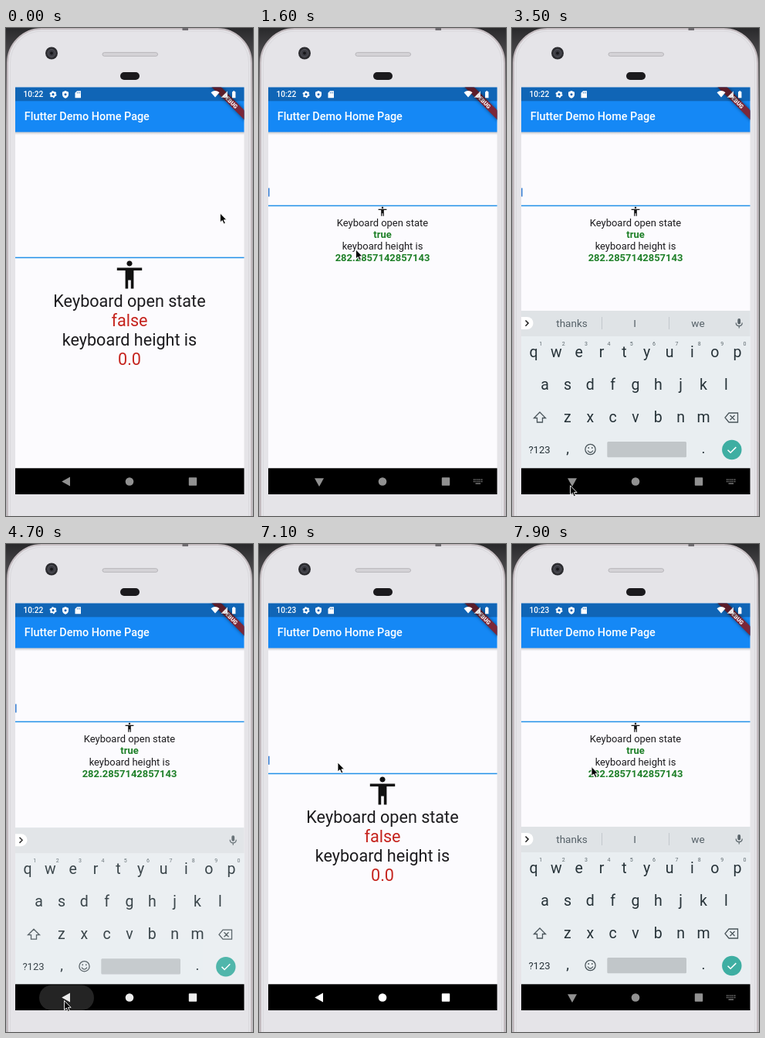
An HTML page that plays this animation: 320 by 630 pixels, repeating every 8000 ms.

```html
<!DOCTYPE html>
<html lang="en">
<head>
<meta charset="utf-8">
<title>Keyboard state demo</title>
<style>
html, body { margin: 0; width: 100%; height: 100%; overflow: hidden; background: #d6d5d9; }
svg { display: block; width: 320px; height: 630px; font-family: Roboto, "Noto Sans", sans-serif; }
.mid { text-anchor: middle; }
</style>
</head>
<body>
<svg viewBox="0 0 320 630">
  <defs>
    <linearGradient id="backdrop" x2="0" y2="1">
      <stop offset="0" stop-color="#29292b"/>
      <stop offset=".07" stop-color="#555356"/>
      <stop offset=".2" stop-color="#a3a1a5"/>
      <stop offset="1" stop-color="#b9b8bc"/>
    </linearGradient>
    <linearGradient id="shade" x2="0" y2="1">
      <stop offset="0" stop-color="#000" stop-opacity=".22"/>
      <stop offset="1" stop-color="#000" stop-opacity="0"/>
    </linearGradient>
    <filter id="blur" x="-50%" y="-100%" width="200%" height="300%"><feGaussianBlur stdDeviation="2"/></filter>
    <clipPath id="screen"><rect x="12" y="76.500" width="296.500" height="525.500"/></clipPath>
    <path id="person" d="M12 2c1.1 0 2 .9 2 2s-.9 2-2 2-2-.9-2-2 .9-2 2-2zm9 7h-6v13h-2v-6h-2v6H9V9H3V7h18v2z"/>
  </defs>

  <!-- phone body -->
  <rect width="320" height="630" fill="url(#backdrop)"/>
  <rect x="2" y="1" width="316" height="680" rx="44" fill="#e4e3e7" stroke="#c3bbbf" stroke-width="2"/>
  <rect x="5.500" y="4" width="309" height="680" rx="41" fill="#e5e4e8" stroke="#dad9dd"/>
  <rect x="228.500" width="7.500" height="3" fill="#6d6a6e"/>
  <circle cx="59" cy="32.500" r="8" fill="#2b2b2f"/>
  <circle cx="59" cy="32.500" r="5" fill="#3c3c43" stroke="#55555c"/>
  <circle cx="59" cy="32.500" r="2" fill="#17171a"/>
  <rect x="125" y="31.700" width="71.500" height="4.600" rx="2.300" fill="#d5d3d7" stroke="#b3b1b6" stroke-width=".9"/>
  <rect x="148" y="57" width="25" height="10" rx="5" fill="#1b1a1d"/>

  <g clip-path="url(#screen)">
    <rect x="12" y="76" width="297" height="494" fill="#fcfbfe"/>
    <rect x="12" y="134" width="297" height="4" fill="url(#shade)"/>
    <rect x="12" y="76" width="297" height="58.300" fill="#1588f5"/>
    <text x="23.800" y="119" font-size="14.4" font-weight="500" fill="#fff">Flutter Demo Home Page</text>
    <rect id="line" x="12" width="297" height="1.500" fill="#2290e8"/>
    <rect id="caret" x="12" width="1.600" height="11" fill="#4285d6"/>
    <g id="closed"></g>
    <g id="open"></g>
    <g transform="translate(308 77) rotate(45)">
      <rect x="-32" y="20.200" width="64" height="8.640" opacity=".5" filter="url(#blur)"/>
      <rect x="-32" y="20.200" width="64" height="8.640" fill="#7b2739"/>
      <text class="mid" y="27.100" font-size="7.300" font-weight="900" fill="#fff">DEBUG</text>
    </g>
    <rect x="12" y="76" width="297" height="18.300" opacity=".26"/>
    <g fill="#fff">
      <text id="clock" x="22.500" y="89.300" font-size="10.100" font-weight="500"></text>
      <circle cx="61" cy="85.700" r="2.600" fill="none" stroke="#fff" stroke-width="2"/>
      <circle cx="61" cy="85.700" r="3.800" fill="none" stroke="#fff" stroke-width="1.500" stroke-dasharray="2 1.980"/>
      <path d="M77 81l4 1.700v3q0 3.500-4 5-4-1.500-4-5v-3z"/>
      <circle cx="77" cy="85.700" r="1.500" fill="#1062b3"/>
      <path d="M92 81.200h5v9h-7.500v-6.500z"/>
      <path d="M92.200 82.700v1.700m1.700-1.700v1.700m1.700-1.700v1.700" stroke="#1062b3" stroke-width=".7"/>
      <path d="M265.500 83.200q5.500-4.300 11 0l-5.500 6.300z"/>
      <path d="M287 81.200v8.500h-8.500z" opacity=".8"/>
      <path d="M293 82.200h1.200v-1h2v1h1.200v8h-4.400z"/>
    </g>
    <g id="keyboard">
      <rect x="12" y="365" width="297" height="224" fill="#e9eef1"/>
      <rect x="12" y="365" width="297" height="33" fill="#dfe3e6"/>
      <path d="M12 373h7.500a8 8 0 0 1 0 16H12z" fill="#fff"/>
      <path d="M17.500 377.500l3.600 3.600-3.600 3.600" fill="none" stroke="#222" stroke-width="1.500"/>
      <g fill="#59646a">
        <rect x="292.300" y="375" width="3.800" height="7.500" rx="1.900"/>
        <path d="M290.200 380.500q0 4.200 4 4.200t4-4.200M294.200 384.700v2.800" fill="none" stroke="#59646a" stroke-width="1.200"/>
      </g>
      <g id="suggestions" fill="#566168" font-size="13.500">
        <path d="M116.500 373v16M203.500 373v16" stroke="#c2c8cc"/>
      </g>
      <g id="keys" fill="#263238"></g>
      <g fill="none" stroke="#4a555b" stroke-width="1.300">
        <path d="M36 496l7.500 7.500h-4v5.500h-7v-5.500h-4z"/>
        <path d="M281 497h11.500v12H281l-5-6zM282.500 500l6 6m0-6l-6 6"/>
        <circle cx="101.500" cy="544" r="6.600"/>
        <path d="M98 545.500q3.500 5 7 0M99.200 541v2M103.800 541v2"/>
      </g>
      <rect x="123.300" y="534" width="102.700" height="20.300" rx="1.500" fill="#c1c6c9"/>
      <circle cx="284.800" cy="544.500" r="12.700" fill="#3eaea2"/>
      <path d="M279.500 544.700l3.600 3.600 7.200-7.200" fill="none" stroke="#fff" stroke-width="1.500"/>
    </g>

    <!-- navigation bar -->
    <rect x="12" y="568.300" width="297" height="34"/>
    <rect id="ripple" x="43" y="569.500" width="71" height="32.500" rx="16.200" fill="#fff"/>
    <g id="nav">
      <path id="back" d="M-5.800 0L5 -6V6Z"/>
      <circle cx="160" cy="585.500" r="5.300"/>
      <rect x="236.800" y="580.300" width="10.400" height="10.400" rx=".8"/>
    </g>
    <g id="switcher" stroke="#8d8d8d" fill="none">
      <path d="M278 583h11.500M278 585.500h11.500" stroke-width="1.300" stroke-dasharray="1.300 1.200"/>
      <path d="M280.500 588.200h6.500" stroke-width="1.300"/>
    </g>
  </g>
  <path id="pointer" d="M0 0V12L2.800 9.500 4.800 14 6.900 13.100 4.900 8.800H8.600Z" stroke="#fff" stroke-width=".9"/>
</svg>

<script>
const LOOP = 8000, STEP = 100;
const $ = id => document.getElementById(id);
const set = (id, attrs) => { for (const k in attrs) $(id).setAttribute(k, attrs[k]); };
const show = (id, on) => set(id, { visibility: on ? 'visible' : 'hidden' });
const label = (s, x, y, size = '', extra = '') =>
  `<text class="mid" x="${x}" y="${y}" ${size && `font-size="${size}"`} ${extra}>${s}</text>`;

function buildStatus(id, size, top, state, height, accent) {
  const iconScale = id === 'open' ? 0.6 : 1.8;
  const lines = ['Keyboard open state', state, 'keyboard height is', height];
  const first = top + 24 * iconScale + size * 0.915;
  $(id).innerHTML =
    `<use href="#person" fill="#111" transform="translate(${160 - 12 * iconScale} ${top}) scale(${iconScale})"/>` +
    lines.map((s, i) => label(s, 160, first + i * size * 7 / 6, size, i % 2 ? accent : 'fill="#1c1b1e"')).join('');
}

function buildKeys() {
  const pitch = 29.35;
  let out = '';
  ['qwertyuiop', 'asdfghjkl', 'zxcvbnm'].forEach((letters, row) => [...letters].forEach((c, i) => {
    const x = 160 + (i - (letters.length - 1) / 2) * pitch;
    out += label(c, x, 425 + row * 42, 19.5);
    if (!row) out += label((i + 1) % 10, x + 9.4, 409.5, 7, 'fill="#5c676d"');
  }));
  $('keys').innerHTML = out + label('?123', 35.5, 549, 13) + label(',', 72, 549, 19) + label('.', 248, 549, 19);
  $('suggestions').innerHTML += label('thanks', 77.5, 386) + label('I', 159, 386) + label('we', 241, 386);
}

buildStatus('closed', 21.6, 296.8, 'false', '0.0', 'fill="#c5231d"');
buildStatus('open', 12.96, 229.6, 'true', '282.2857142857143', 'fill="#1f8029" font-weight="700"');
buildKeys();

const clamp = v => Math.min(1, Math.max(0, v));
const ramp = (t, from, to) => clamp((t - from) / (to - from));
const smooth = v => v * v * (3 - 2 * v);

// [time, x, y] of the pointer tip
const route = [[0, 277.4, 239], [400, 277.4, 239], [1400, 125.5, 286], [2000, 125.5, 286], [3100, 75.5, 591],
  [4700, 75.5, 589.5], [5300, 77.3, 589], [5700, 77.3, 589], [6700, 102, 282], [7100, 102, 282], [7500, 103, 287.5], [LOOP, 103, 287.5]];

function pointerAt(t) {
  const i = route.findIndex(p => p[0] > t);
  const [a, b] = [route[i - 1], route[i]];
  const k = smooth(ramp(t, a[0], b[0]));
  return [a[1] + (b[1] - a[1]) * k, a[2] + (b[2] - a[2]) * k];
}

function draw(t) {
  const second = t >= 7100;
  const open = (t >= 1600 && t < 4800) || t >= 7200;
  const backDown = (t >= 1600 && t < 4600) || t >= 7200;
  show('open', open);
  show('closed', !open);
  set('line', { y: open ? 228.7 : 295.7 });

  const focusAge = t - (second ? 7100 : 1500);
  show('caret', focusAge >= 0 && focusAge % 1000 < 500);
  set('caret', { y: open ? 206.6 : 273.8 });
  $('clock').textContent = t < 5100 ? '10:22' : '10:23';

  const shown = t < 4600 ? ramp(t, 1600, 1900) : second ? ramp(t, 7200, 7500) : 1 - ramp(t, 4680, 4880);
  const drop = 20 * (1 - shown) ** 2 + (t >= 4600 && !second ? 1 : 0);
  set('keyboard', { opacity: shown, transform: `translate(0 ${drop})` });
  show('suggestions', t < 4600 || second);

  const white = second ? (t < 7200 ? 1 : 0) : ramp(t, 4550, 4730);
  const grey = Math.round(145 + 110 * white);
  set('nav', { fill: `rgb(${grey},${grey},${grey})` });
  set('back', { transform: backDown ? 'translate(78 586.2) rotate(-90)' : 'translate(78 585.5)' });
  show('switcher', backDown);
  set('ripple', { opacity: t < 4600 ? 0 : 0.14 * (1 - ramp(t, 4750, 5050)) });
  set('pointer', { transform: `translate(${pointerAt(t)})` });
}

const start = performance.now();
function tick() {
  const t = Math.max(0, performance.now() - start) % LOOP;
  draw(Math.floor(t / STEP) * STEP);
  requestAnimationFrame(tick);
}
draw(0);
requestAnimationFrame(tick);
</script>
</body>
</html>
```
